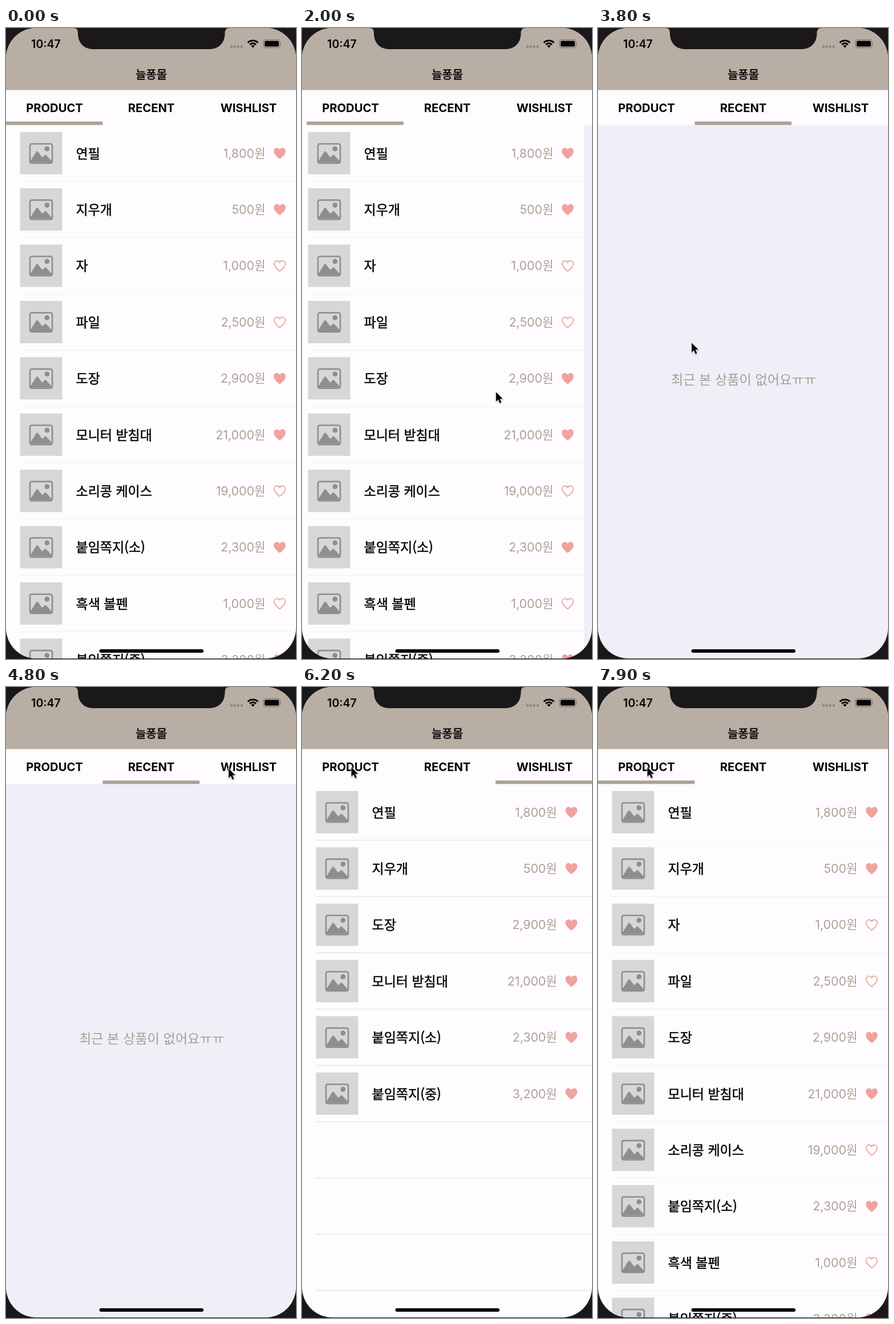
An HTML page that plays this animation: 508x1103 px, repeating every 8 s.

```html
<!DOCTYPE html>
<html lang="ko">
<head>
<meta charset="utf-8">
<style>
  html, body { margin: 0; width: 100%; height: 100%; overflow: hidden; background: #1a181b; }
  svg { display: block; width: 508px; height: 1103px; }
  text { font-family: Inter, "Noto Sans CJK KR", "Noto Sans CJK", sans-serif; fill: #050406; }
  .ko { font-family: "Noto Sans CJK KR", "Noto Sans CJK", sans-serif; }
  .mid { text-anchor: middle; }
  .tab { font-size: 20.2px; font-weight: 700; }
  .name { font-size: 23px; font-weight: 500; stroke: #050406; stroke-width: .5px; }
  .title { font-size: 20px; }
  .price { font-size: 21.3px; fill: #aba296; text-anchor: end; }
  .empty { font-size: 23.2px; fill: #aa9f96; }
</style>
</head>
<body>
<svg viewBox="0 0 508 1103">
  <defs>
    <clipPath id="screen"><rect width="508" height="1102" rx="53"/></clipPath>
    <path id="heart" d="M0 10.2C-4.5 6.8-10.3 2.3-10.3-3.6C-10.3-7-8-9.4-5-9.4C-2.8-9.4-1-8.2 0-6.2C1-8.2 2.8-9.4 5-9.4C8-9.4 10.3-7 10.3-3.6C10.3 2.3 4.5 6.8 0 10.2Z"/>
    <g id="thumb">
      <rect x="24.5" y="-37" width="74" height="74" fill="#d7d6d9"/>
      <g fill="#8e8d90">
        <rect x="42" y="-16.3" width="39" height="33.6" rx="3" fill="none" stroke="#8e8d90" stroke-width="2.6"/>
        <circle cx="71.8" cy="-7.6" r="4.4"/>
        <path d="M43 16V13.5L53 -2.5Q54.5 -4 56 -2.5L63.5 7.5L67.5 3.5Q69 2 70.5 3.5L80 14V16Z"/>
      </g>
    </g>
  </defs>
  <g clip-path="url(#screen)">
    <g id="recent">
      <rect width="508" height="1103" fill="#f0eff7"/>
      <text class="ko mid empty" x="255" y="623">최근 본 상품이 없어요ㅠㅠ</text>
    </g>
    <g id="product"></g>
    <g id="wish"></g>
    <rect width="508" height="109" fill="#b9aea3"/>
    <rect y="108.5" width="508" height="61" fill="#fefcfe"/>
    <text class="mid" x="70" y="35" font-size="19.6" font-weight="600">10:47</text>
    <path d="M394.8 32.5H413" stroke="#93897f" stroke-width="4.8" stroke-linecap="round" stroke-dasharray="0 6"/>
    <g transform="translate(432.5 34.5)" fill="none" stroke="#050406" stroke-width="3">
      <path d="M-8.9-8.9A12.6 12.6 0 0 1 8.9-8.9M-5.4-5.4A7.6 7.6 0 0 1 5.4-5.4"/>
      <path d="M0 0L-3.2-3.2A4.5 4.5 0 0 1 3.2-3.2Z" fill="#050406" stroke="none"/>
    </g>
    <rect x="451" y="20.5" width="29" height="14" rx="4" fill="none" stroke="#766e68" stroke-width="1.2"/>
    <rect x="453" y="22.5" width="25" height="10" rx="2.2" fill="#050406"/>
    <path d="M481.5 25.3Q483.2 27.5 481.5 29.7Z" fill="#766e68"/>
    <text class="ko mid name title" x="254.5" y="88.5">늘퐁몰</text>
    <text class="tab mid" x="85" y="147">PRODUCT</text>
    <text class="tab mid" x="254.5" y="147">RECENT</text>
    <text class="tab mid" x="425" y="147">WISHLIST</text>
    <rect id="bar" y="163.5" width="169.5" height="6" fill="#aaa294"/>
    <path d="M117 0C124 0 126 3 126 9C126 27 137 37 154 37H355C372 37 383.5 27 383.5 9C383.5 3 386 0 392 0Z" fill="#1a181b"/>
    <rect x="163.5" y="1086" width="182.5" height="6" rx="3"/>
  </g>
  <path id="cursor" d="M0 .5V16.9L3.8 13.4L6.6 19.7L9.4 18.5L6.7 12.3H11.8Z" stroke="#fff" stroke-width="1.4" paint-order="stroke" style="filter:drop-shadow(0 1px 1px #0005)"/>
</svg>
<script>
const $ = id => document.getElementById(id);
const ROW = 98.4, TOP = 169.6, W = 508, TAB = 169.5;

const goods = [
  ['연필', '1,800', true], ['지우개', '500', true], ['자', '1,000', false],
  ['파일', '2,500', false], ['도장', '2,900', true], ['모니터 받침대', '21,000', true],
  ['소리콩 케이스', '19,000', false], ['붙임쪽지(소)', '2,300', true],
  ['흑색 볼펜', '1,000', false], ['붙임쪽지(중)', '3,200', true]
];

function row([name, price, liked], i, shift) {
  const look = liked ? 'fill="#efa3a0"' : 'fill="none" stroke="#e5a09c" stroke-width="1.8"';
  return `<g transform="translate(0 ${TOP + ROW * (i + 0.5)})">
    <use href="#thumb"/>
    <text class="name ko" x="122.5" y="8.7">${name}</text>
    <text class="price" x="${454.5 - shift}" y="7.8">${price}원</text>
    <use href="#heart" transform="translate(${479.5 - shift} 0) scale(${liked ? 1 : 0.93})" ${look}/>
  </g>`;
}

function list(items, shift, line) {
  let out = `<rect width="${W}" height="1103" fill="#fefcfe"/>`;
  for (let i = 1; i < 10; i++)
    out += `<rect x="24.5" y="${TOP + ROW * i - 0.7}" width="484" height="1.1" fill="${line}"/>`;
  return out + items.map((item, i) => row(item, i, shift)).join('');
}

$('product').innerHTML = list(goods, 0, '#f3f1f4');
$('wish').innerHTML = list(goods.filter(item => item[2]), 7.6, '#dfdee2');

function ease(t, start, length) {
  const p = Math.min(1, Math.max(0, (t - start) / length));
  return p * p * (3 - 2 * p);
}

// Pointer glides; bow bends the path sideways
const glides = [
  { start: 250, length: 750, x: 357, y: 636, bow: -45 },
  { start: 1920, length: 380, x: 207, y: 636, bow: 0 },
  { start: 3683, length: 317, x: 148, y: 357, bow: -30 },
  { start: 4130, length: 670, x: 390, y: 142, bow: 0 },
  { start: 5630, length: 570, x: 86.5, y: 139.5, bow: 0 }
];

function pointer(t) {
  let x = 430, y = 1080;
  for (const g of glides) {
    const p = ease(t, g.start, g.length);
    x += (g.x - x) * p + g.bow * Math.sin(Math.PI * p);
    y += (g.y - y) * p;
  }
  return [x, y];
}

const move = (id, x, y = 0) => $(id).setAttribute('transform', `translate(${x} ${y})`);
const movePage = (id, x) => move(id, Math.round(x)); // whole pixels keep the seams closed

function draw(now) {
  const t = Math.floor(now % 8000 / 100) * 100; // ten pictures a second
  const drag = 125 * ease(t, 1920, 380) + (W - 125) * ease(t, 2300, 400);
  const next = ease(t, 4940, 330), back = ease(t, 7640, 260);
  movePage('product', W * back - drag);
  movePage('recent', W - drag - W * next);
  movePage('wish', W * (1 - next + back));
  move('bar', TAB * (ease(t, 1960, 300) + ease(t, 4932, 332) - 2 * back));
  move('cursor', ...pointer(t));
  $('cursor').style.visibility = t < 300 ? 'hidden' : 'visible';
}

const start = performance.now();
function tick() {
  draw(performance.now() - start);
  requestAnimationFrame(tick);
}
tick();
</script>
</body>
</html>
```
